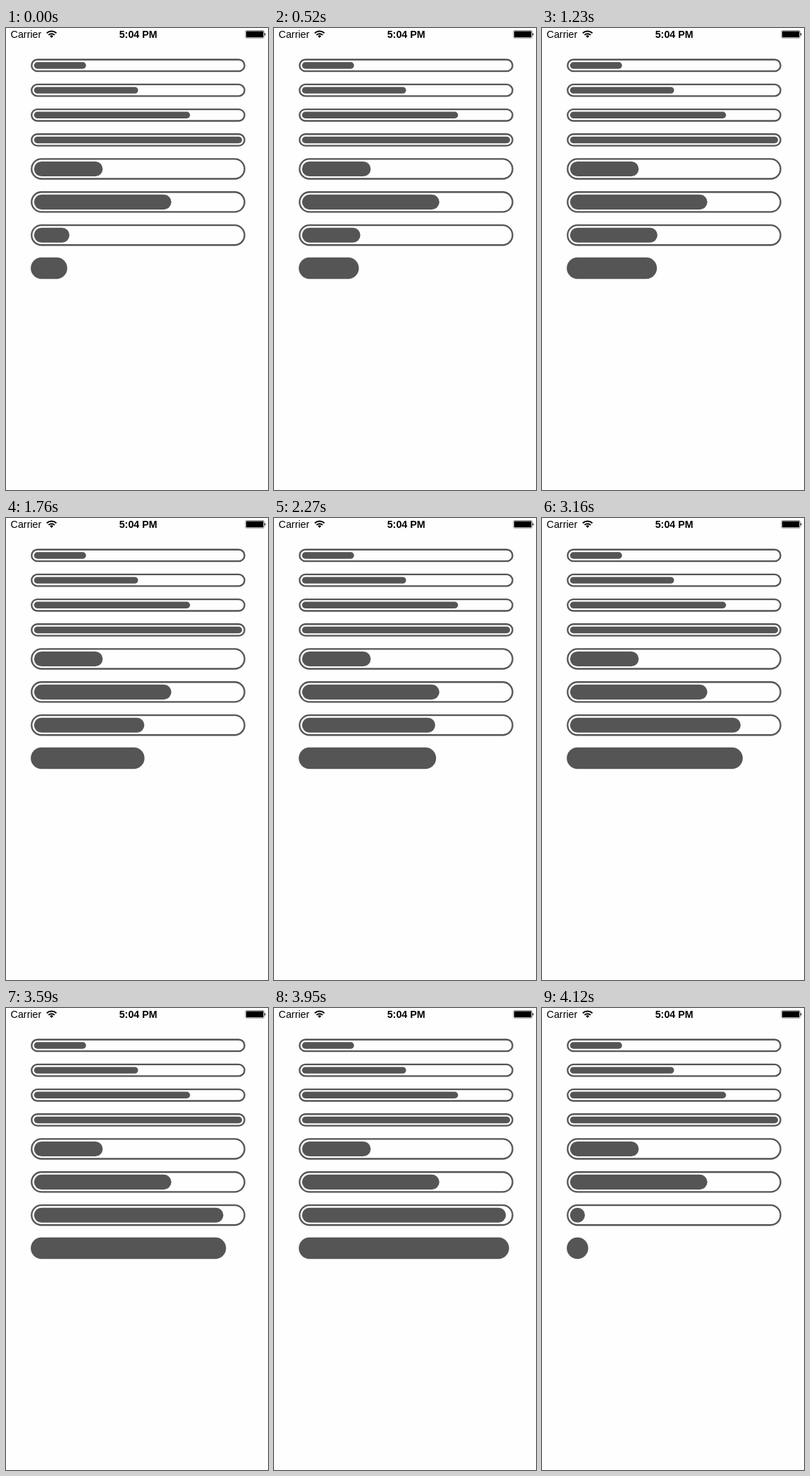
Write an HTML page that moves like this. It is 372 px wide and 654 px high and loops after 4190 ms.

```html
<!DOCTYPE html>
<html lang="en">
<head>
<meta charset="utf-8">
<title>Progress bars</title>
<style>
  html, body { margin: 0; width: 100%; height: 100%; overflow: hidden; background: #fefefe; }
  svg { display: block; }
  text { font-family: "Liberation Sans", Arial, sans-serif; font-size: 14.3px; }
</style>
</head>
<body>
<svg width="372" height="654" viewBox="0 0 372 654">
  <text x="6.6" y="14">Carrier</text>
  <g fill="none" stroke="#000" stroke-width="2">
    <path d="M57.9 7.3a9.7 9.7 0 0 1 13.6 0M60.4 9.9a6.1 6.1 0 0 1 8.6 0"/>
    <path d="M62.3 11.5a3.4 3.4 0 0 1 4.8 0L64.7 14Z" fill="#000" stroke="none"/>
  </g>
  <text x="187.7" y="14" text-anchor="middle" font-weight="bold">5:04 PM</text>
  <rect x="340" y="3.6" width="26.4" height="10.6" rx="1.4" fill="none" stroke="#777" stroke-width=".8"/>
  <rect x="341" y="4.6" width="24.4" height="8.6" rx=".6"/>
  <path d="M367.2 7.1a1.9 1.9 0 0 1 0 3.6Z"/>
  <g id="bars" transform="translate(0 43.6) scale(1.171875)"></g>
</svg>
<script>
const LOOP = 4190, COLOR = '#555', LEFT = 30, WIDTH = 260;
const bars = document.getElementById('bars');

function pill(x, y, w, h, style) {
  const r = document.createElementNS('http://www.w3.org/2000/svg', 'rect');
  const attrs = { x, y, width: w, height: h, rx: h / 2, ...style };
  for (const key in attrs) r.setAttribute(key, attrs[key]);
  return bars.appendChild(r);
}

// Returns a setter for the bar's progress, 0 to 1.
function addBar(y, h, framed = true) {
  if (framed) pill(LEFT + 1, y + 1, WIDTH - 2, h - 2, { fill: 'none', stroke: COLOR, 'stroke-width': 2 });
  const inset = framed ? 4 : 0, full = WIDTH - 2 * inset, size = h - 2 * inset;
  const fill = pill(LEFT + inset, y + inset, full, size, { fill: COLOR });
  return p => fill.setAttribute('width', Math.max(size, full * p));
}

[.25, .5, .75, 1].forEach((p, i) => addBar(30 * i, 16)(p));
[.33, .66].forEach((p, i) => addBar(120 + 40 * i, 26)(p));
const moving = [addBar(200, 26), addBar(240, 26, false)];

// The display refreshes in evenly spaced runs: first time, last time, count.
const runs = [[80, 520, 6], [610, 1060, 6], [1150, 1670, 7], [1760, 2270, 7],
  [2360, 2810, 6], [2890, 3330, 6], [3420, 3860, 6], [3950, 4120, 3]];
const ticks = [0];
for (const [from, to, n] of runs)
  for (let i = 0; i < n; i++)
    ticks.push(Math.floor((from + (to - from) * i / (n - 1)) / 10) * 10);
const RESET = 4120;

function progress(t) {
  const tick = ticks.findLast(s => s <= t);
  return tick >= RESET ? 0 : Math.min(100, Math.round(16.96 + .02055 * tick)) / 100;
}

function draw() {
  const p = progress(performance.now() % LOOP);
  moving.forEach(set => set(p));
  requestAnimationFrame(draw);
}
draw();
</script>
</body>
</html>
```
